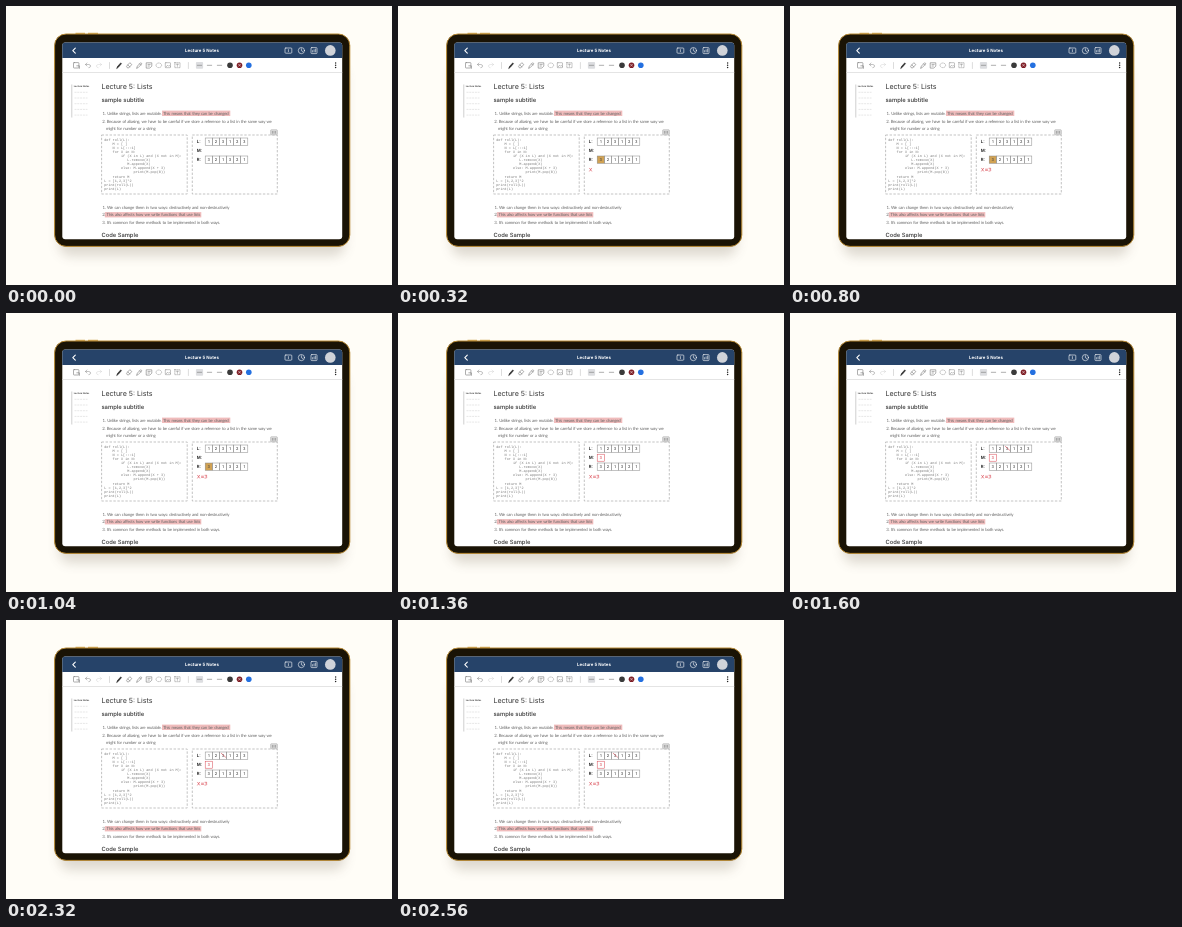
Write an HTML page that moves like this. It is 386x279 px and loops after 2.64 s.

```html
<!DOCTYPE html>
<html lang="en">
<head>
<meta charset="utf-8">
<title>Lecture notes on a tablet</title>
<style>
html, body { margin: 0; width: 100%; height: 100%; overflow: hidden; background: #fffdf7; }
svg { display: block; width: 386px; height: 279px; }
text { white-space: pre; text-rendering: geometricPrecision; }
.ui { font-family: Inter, sans-serif; fill: #333; }
.hand { font: 4.3px Lato, sans-serif; letter-spacing: -.22px; word-spacing: .6px; fill: #666; }
.code { font: 3.5px "Liberation Mono", monospace; fill: #777; }
.cell { font: 500 3.9px Inter, sans-serif; text-anchor: middle; fill: #444; }
.line { fill: none; stroke: #777; stroke-width: .6; stroke-linecap: round; stroke-linejoin: round; }
.pale { stroke: #c4c4c4; }
.white { stroke: #fff; }
.box { fill: none; stroke: #aaa; stroke-width: .7; stroke-dasharray: 2.4 1.6; }
.grid { fill: none; stroke: #888; stroke-width: .5; }
.red { stroke: #d8434e; }
</style>
</head>
<body>
<svg viewBox="0 0 386 279">
  <defs>
    <filter id="soft" x="-20%" y="-20%" width="140%" height="150%"><feGaussianBlur stdDeviation="6"/></filter>
    <clipPath id="screen"><rect x="56.3" y="36.5" width="279.9" height="196.7" rx="3"/></clipPath>
  </defs>
  <rect width="386" height="279" fill="#fffdf7"/>
  <rect x="53" y="60" width="286" height="190" rx="12" fill="#5a4c38" opacity=".2" filter="url(#soft)"/>
  <path d="M69.5 27.3h9.5M82 27.3h10" stroke="#c9963a"/>
  <rect x="48.6" y="28" width="295.2" height="212.4" rx="11.5" fill="#1a1305" stroke="#b88a35"/>
  <g clip-path="url(#screen)">
    <rect x="56" y="36" width="281" height="198" fill="#fff"/>
    <rect x="56" y="36" width="281" height="16" fill="#264369"/>
    <path d="M56 66.5h281" stroke="#ddd" stroke-width=".8"/>
    <g class="line white">
      <path d="M69.3 42.2l-2.5 2.5 2.5 2.5" stroke-width="1.1"/>
      <rect x="279" y="42" width="6.8" height="5.2" rx=".8"/><path d="M282.4 43.6v2"/>
      <circle cx="295.4" cy="44.6" r="3.1"/><path d="M295.4 42.7v2l1.4.8"/>
      <rect x="305" y="41.6" width="6" height="6" rx=".8"/><path d="M306.6 46v-1.4M308.1 46v-2.2M309.6 46v-3"/>
    </g>
    <circle cx="324.3" cy="44.4" r="5.3" fill="#d0d3d9"/>
    <text class="ui" x="196" y="46.3" font-size="4.4" font-weight="700" text-anchor="middle" style="fill:#fff">Lecture 5 Notes</text>

    <g class="line">
      <rect x="67.5" y="56.6" width="5.4" height="5.4" rx=".6"/><path d="M70.8 59.8h2.6v2.6"/>
      <path d="M110.8 62.2l.7-1.7 3.2-3.6.8.7-3.2 3.7z" fill="#222" stroke="#222"/>
      <path d="M120.8 60l3-3.3 2 1.8-3 3.4h-1zM121.8 58.9l2 2"/>
      <path d="M130.7 62l.7-1.9 3.3-3.4 1.2 1.1-3.4 3.5zM133.6 57.8l1.2 1.2"/>
      <path d="M140.6 56.8h5.2v3.3l-2 2h-3.2zM142 58.4h2.2M142 60h1.4"/>
    </g>
    <g class="line" stroke-opacity=".75">
      <ellipse cx="152.8" cy="59.3" rx="2.8" ry="2.3" stroke-dasharray=".8 1.1"/>
      <rect x="159.3" y="56.7" width="5.2" height="5" rx=".5"/><path d="M160 61l1.6-1.8 1 1 .8-.7 1 1"/>
      <rect x="168.8" y="56.7" width="5.2" height="5" stroke-dasharray="1 1"/><path d="M170.2 58.2h2.4M171.4 58.2v2.2"/>
    </g>
    <g class="line pale">
      <path d="M81 57l-1.6 1.5 1.6 1.5M79.5 58.5h3.4q1.7.2 1.7 1.6t-1.8 1.6" stroke="#999"/>
      <path d="M94 57l1.6 1.5-1.6 1.5M95.5 58.5h-3.4q-1.7.2-1.7 1.6t1.8 1.6" opacity=".6"/>
      <path d="M182.4 56.5v6M103.5 56.5v6"/>
    </g>
    <rect x="189.9" y="55.9" width="7.2" height="6.8" rx="1" fill="#dcdde0"/>
    <path class="line" d="M191.3 59.3h4.4M201.3 59.3h4.4M211.3 59.3h4.4"/>
    <circle cx="224" cy="59.2" r="2.8" fill="#3a3a3a"/>
    <circle cx="233.5" cy="59.2" r="2.8" fill="#7e1d25"/>
    <path d="M232.1 57.8l2.8 2.8M234.9 57.8l-2.8 2.8" stroke="#fff" stroke-width=".5"/>
    <circle cx="242.8" cy="59.2" r="2.8" fill="#2470e0"/>
    <g fill="#222"><circle cx="329.6" cy="57" r=".75"/><circle cx="329.6" cy="59.3" r=".75"/><circle cx="329.6" cy="61.6" r=".75"/></g>

    <path d="M65.8 78.5v33" stroke="#bbb" stroke-width=".7"/>
    <text class="ui" x="67.8" y="81.2" font-size="2.3" font-weight="600">Lecture Notes</text>
    <path d="M68.5 86.3h13M68.5 92h13M68.5 97.7h13M68.5 103.4h13M68.5 109.1h13" stroke="#ddd" stroke-width=".7" stroke-dasharray="2 .8"/>

    <text class="ui" x="95.4" y="83.3" font-size="7.1">Lecture 5: Lists</text>
    <text class="ui" x="95.4" y="95.6" font-size="5.9" font-weight="500">sample subtitle</text>
    <text class="ui" x="95.4" y="230.8" font-size="5.8" font-weight="500">Code Sample</text>
    <rect x="156" y="104.6" width="68.3" height="5.4" fill="#f0bcbc"/>
    <rect x="98.8" y="206.1" width="96.5" height="5.3" fill="#f0bcbc"/>
    <g id="notes"></g>

    <rect class="box" x="95.6" y="129" width="85.6" height="59"/>
    <rect class="box" x="186.3" y="129" width="85" height="59"/>
    <rect x="264.7" y="123.8" width="6.6" height="5" rx=".6" fill="#e1e1e1" stroke="#999" stroke-width=".5"/>
    <path class="line" d="M266.4 125.4v1.9M268 125.4v1.9M269.6 125.4v1.9" stroke-width=".4"/>
    <g id="code"></g>

    <rect id="mark" x="199.2" y="150" width="7.1" height="7.3" fill="#d1a253"/>
    <g id="lists"></g>
    <path id="strike" class="line red" d="M215.4 133.4l4.2 3.8" pathLength="1" stroke-dasharray="1 1"/>
    <g id="moved">
      <rect class="grid red" x="199.2" y="141.2" width="7.1" height="7"/>
      <text class="cell" x="202.75" y="146.2" style="fill:#d8434e">3</text>
    </g>
    <g id="answer" class="line red">
      <path d="M191.6 162.3l2 2.8M193.6 162.3l-2 2.8"/>
      <path d="M195.5 163.2h2M195.5 164.4h2"/>
      <path d="M199 162.3h1.8l-.9 1.1q1.3.1 1 1t-2 .7"/>
    </g>
  </g>
</svg>
<script>
const LOOP = 2640, STEP = 80;
const $ = id => document.getElementById(id);

function add(parent, tag, attrs, text = "") {
  const el = document.createElementNS("http://www.w3.org/2000/svg", tag);
  for (const key in attrs) el.setAttribute(key, attrs[key]);
  el.textContent = text;
  return parent.appendChild(el);
}

const notes = [
  [96.6, 109, "1. Unlike strings, lists are mutable."],
  [157, 109, "This means that they can be changed"],
  [96.2, 116.6, "2. Because of aliasing, we have to be careful if we store a reference to a list in the same way we"],
  [100, 124, "might for number or a string"],
  [96.4, 202.8, "1. We can change them in two ways: destructively and non-destructively"],
  [96.2, 210.2, "2. This also affects how we write functions that use lists"],
  [96.2, 217.5, "3. It's common for these methods to be implemented in both ways."]
];
for (const [x, y, line] of notes) add($("notes"), "text", { x, y, class: "hand" }, line);

const code = `def roll(L):
    M = [ ]
    N = L[:::1]
    for X in N:
        if (X in L) and (X not in M):
           L.remove(X)
           M.append(X)
        else: M.append(X + 3)
              print(M.pop(0))
    return M
L = [1,2,3]*2
print(roll(L))
print(L)`;
code.split("\n").forEach((line, i) =>
  add($("code"), "text", { x: 98.2, y: 134.8 + i * 4.08, class: "code" }, line));

function row(name, y, values) {
  add($("lists"), "text", { x: 190.8, y: y + 5.2, class: "ui", "font-size": 4.3, "font-weight": 700 }, name);
  [...values].forEach((value, i) => {
    const x = 199.2 + i * 7.1;
    add($("lists"), "rect", { x, y, width: 7.1, height: 7.3, class: "grid" });
    add($("lists"), "text", { x: x + 3.55, y: y + 5.1, class: "cell" }, value);
  });
}
row("L:", 132, "123123");
row("M:", 141, "");
row("R:", 150, "321321");

const strokes = [...$("answer").children];
for (const stroke of strokes) {
  stroke.setAttribute("pathLength", 1);
  stroke.setAttribute("stroke-dasharray", "1 1");
}
const ramp = (t, from, to) => Math.min(1, Math.max(0, (t - from) / (to - from)));
const show = (el, on) => el.style.visibility = on ? "visible" : "hidden";
function draw(el, amount) {
  show(el, amount > 0);
  el.style.strokeDashoffset = 1 - amount;
}

function render(now) {
  const t = Math.floor((now % LOOP) / STEP) * STEP;
  show($("mark"), t >= 160 && t < 1200);
  strokes.forEach((stroke, i) => draw(stroke, ramp(t, 240 + i * 80, 320 + i * 80)));
  show($("moved"), t >= 1280);
  draw($("strike"), ramp(t, 1360, 1520));
  requestAnimationFrame(render);
}
render(performance.now());
</script>
</body>
</html>
```
